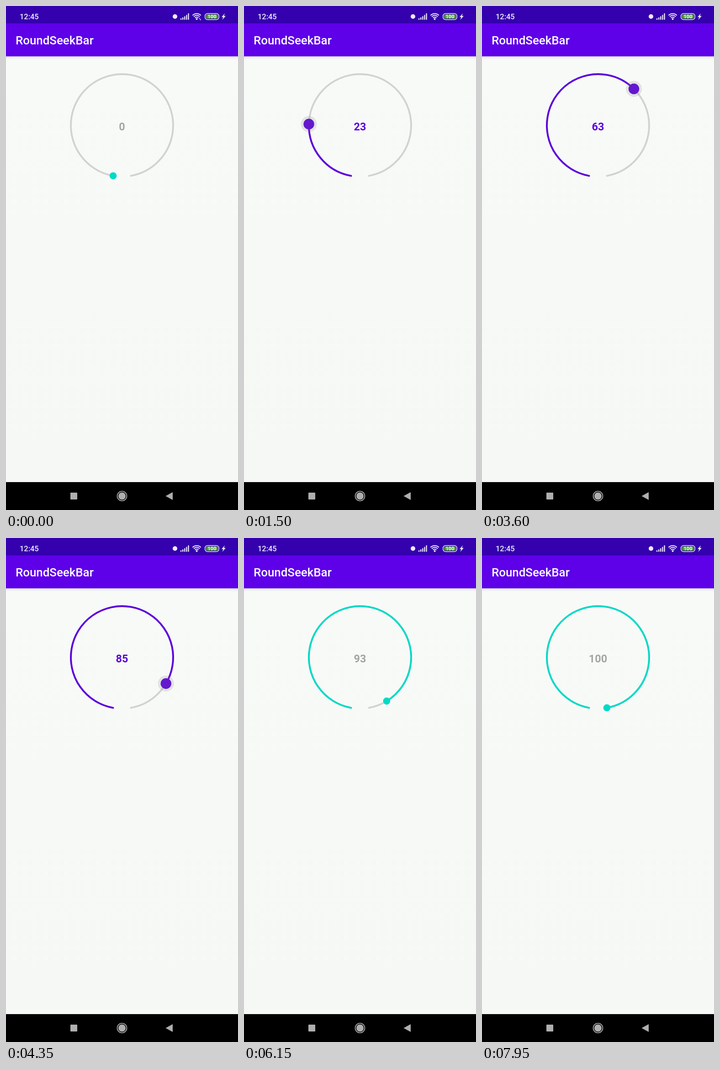
An HTML page with a canvas that plays this animation: 508x1102 px, repeating every 8 s.

```html
<!DOCTYPE html>
<html lang="en">
<head>
<meta charset="utf-8">
<title>RoundSeekBar</title>
<style>
html, body { margin: 0; width: 100%; height: 100%; overflow: hidden; background: #f7f9f7; }
canvas { display: block; width: 508px; height: 1102px; }
</style>
</head>
<body>
<canvas id="stage"></canvas>
<script>
const W = 508, H = 1102, LOOP = 8000, TICK = 50;
const CX = 254, CY = 261, R = 112;
const PURPLE = '#5c00df', TEAL = '#00dac6', TRACK = '#d1d3d1', GREY = '#a3a5a3';
const FONT = 'Roboto, "Noto Sans", sans-serif';

const canvas = document.getElementById('stage');
const ctx = canvas.getContext('2d');
const dpr = window.devicePixelRatio || 1;
canvas.width = W * dpr;
canvas.height = H * dpr;
ctx.scale(dpr, dpr);

// Each drag: press time, release time, and [time, progress] points on the way.
const drags = [
  { down: 350, up: 1950, path: [[350, 0], [450, 1.9], [1150, 16.6], [1500, 23.95], [1900, 32.4]] },
  { down: 3000, up: 5400, path: [[3000, 32.4], [3080, 35.5], [3600, 63.1], [3800, 69.2], [4350, 85.5], [4650, 91.6], [4950, 93.7]] },
  { down: 6400, up: 7800, path: [[6400, 93.7], [7200, 98.9], [7450, 100]] }
];
const points = drags.flatMap(d => d.path);
const slopes = points.slice(1).map((p, i) => (p[1] - points[i][1]) / (p[0] - points[i][0]));

function tangent(i) {
  const a = slopes[i - 1] || 0, b = slopes[i] || 0;
  return a * b > 0 ? 2 * a * b / (a + b) : 0;
}

// Monotone cubic through the points.
function progressAt(t) {
  if (t <= points[0][0]) return points[0][1];
  const i = points.findIndex(p => p[0] > t) - 1;
  if (i < 0) return points[points.length - 1][1];
  const [t0, v0] = points[i], [t1, v1] = points[i + 1];
  const d = t1 - t0, u = (t - t0) / d, w = 1 - u;
  return v0 * (1 + 2 * u) * w * w + v1 * u * u * (3 - 2 * u)
    + d * u * w * (tangent(i) * w - tangent(i + 1) * u);
}

const clamp = x => Math.max(0, Math.min(1, x));
const angleAt = value => (100 + 3.4 * value) * Math.PI / 180;

function rect(x, y, w, h, color) {
  ctx.fillStyle = color;
  ctx.fillRect(x, y, w, h);
}

function disc(x, y, r, color) {
  ctx.fillStyle = color;
  ctx.beginPath();
  ctx.arc(x, y, r, 0, Math.PI * 2);
  ctx.fill();
}

function arc(x, y, r, from, to, width, color, cap = 'butt') {
  ctx.strokeStyle = color;
  ctx.lineWidth = width;
  ctx.lineCap = cap;
  ctx.beginPath();
  ctx.arc(x, y, r, from, to);
  ctx.stroke();
}

function poly(coords, color) {
  ctx.fillStyle = color;
  ctx.beginPath();
  coords.forEach(([x, y]) => ctx.lineTo(x, y));
  ctx.closePath();
  ctx.fill();
}

function pill(x, y, w, h, r) {
  ctx.beginPath();
  ctx.roundRect(x, y, w, h, r);
}

function text(str, x, y, size, weight, color, align = 'left') {
  ctx.font = `${weight} ${size}px ${FONT}`;
  ctx.textAlign = align;
  ctx.fillStyle = color;
  ctx.fillText(str, x, y);
}

function drawBackground() {
  const page = ctx.createLinearGradient(0, 110, 0, 1041);
  page.addColorStop(0, '#f8faf8');
  page.addColorStop(1, '#f6f8f5');
  rect(0, 110, W, 931, page);
  const shadow = ctx.createLinearGradient(0, 110, 0, 117);
  shadow.addColorStop(0, 'rgba(0,0,0,0.14)');
  shadow.addColorStop(0.4, 'rgba(0,0,0,0.05)');
  shadow.addColorStop(1, 'rgba(0,0,0,0)');
  rect(0, 110, W, 7, shadow);
  rect(0, 0, W, 38, '#3500ae');
  rect(0, 38, W, 72, '#5e00e8');
  text('RoundSeekBar', 21, 84, 25.9, 500, '#fff');
}

function drawStatus(t) {
  const ink = '#f1edfa';
  text('12:45', 30, 29.3, 16.4, 500, ink);
  disc(370, 23, 5, ink);
  [3, 5, 7.5, 10.5, 14].forEach((h, i) => rect(382 + i * 4.1, 30 - h, 2.3, h, ink));

  const mid = -Math.PI / 2, half = 0.76;
  [5.6, 9.4, 13.2].forEach(r => arc(417.6, 30, r, mid - half, mid + half, 2, ink));
  disc(417.6, 28.6, 2, ink);
  if (t < 700) {
    poly([[422.4, 28], [424, 25.6], [425.6, 28]], ink);
    poly([[424, 29], [427.4, 29], [425.7, 31.4]], ink);
  }

  ctx.strokeStyle = ink;
  ctx.lineWidth = 1.5;
  pill(435.8, 16.4, 30.4, 13.4, 5.5);
  ctx.stroke();
  ctx.fillStyle = '#45a820';
  pill(438, 18.6, 26, 9, 3.2);
  ctx.fill();
  text('100', 451, 27.1, 11, 700, '#fff', 'center');
  poly([[479.2, 16], [472, 24.3], [475.8, 24.3], [473.4, 30.6], [481, 21.8], [477, 21.8]], ink);
}

function drawNav() {
  const ink = '#afafaf';
  rect(0, 1041, W, 61, '#000');
  ctx.fillStyle = ink;
  pill(141, 1064, 15, 15, 1);
  ctx.fill();
  disc(254, 1071.5, 8, ink);
  arc(254, 1071.5, 10.5, 0, Math.PI * 2, 1.7, ink);
  poly([[349.5, 1071.5], [365, 1063], [365, 1080]], ink);
}

function drawSeekBar(t) {
  const value = progressAt(t), angle = angleAt(value);
  const x = CX + R * Math.cos(angle), y = CY + R * Math.sin(angle);
  const pressed = drags.some(d => t >= d.down && t < d.up);
  const color = pressed ? PURPLE : TEAL;

  arc(CX, CY, R, angleAt(0), angleAt(100), 3.9, TRACK, 'round');
  if (value > 0) arc(CX, CY, R, angleAt(0), angle, 3.9, color, 'round');
  disc(x, y, pressed ? 11.7 : 7.8, color);

  for (const d of drags) {
    if (t < d.down || t > d.up + 100) continue;
    const grow = clamp((t - d.down + TICK) / 150);
    const fade = 1 - clamp((t - d.up + TICK) / 150);
    if (fade > 0) disc(x, y, 10 + 7.5 * grow, `rgba(128,128,128,${0.19 * fade})`);
  }
  text(String(Math.floor(value + 1e-6)), CX, 272.3, 23.4, 700, pressed ? PURPLE : GREY, 'center');
}

function draw(t) {
  drawBackground();
  drawStatus(t);
  drawSeekBar(t);
  drawNav();
}

let start;
function frame(now) {
  if (start === undefined) start = now;
  const t = (now - start) % LOOP;
  draw(Math.floor(t / TICK) * TICK);
  requestAnimationFrame(frame);
}
draw(0);
requestAnimationFrame(frame);
</script>
</body>
</html>
```
